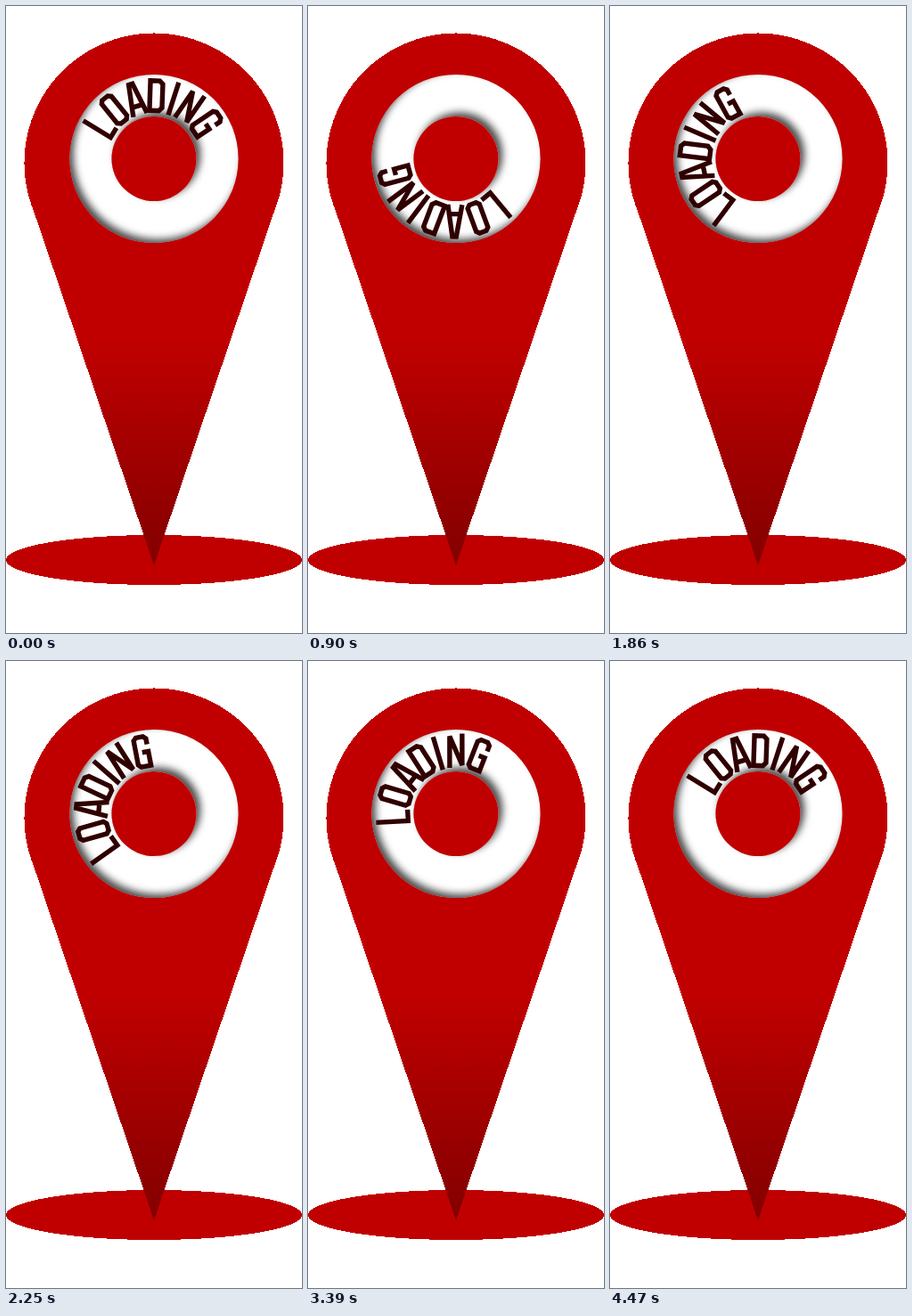
Animation of 332 by 704 pixels, one loop 4500 ms. Source, as an HTML page:

```html
<!DOCTYPE html>
<html lang="en">
<head>
<meta charset="utf-8">
<title>Loading</title>
<style>
  html, body { margin: 0; width: 100%; height: 100%; overflow: hidden; background: #fff; }
  svg { display: block; width: 332px; height: 704px; }
</style>
</head>
<body>
<svg viewBox="0 0 332 704" role="img" aria-label="LOADING">
  <defs>
    <linearGradient id="body" gradientUnits="userSpaceOnUse" x1="0" y1="376" x2="0" y2="630">
      <stop stop-color="#c00000"/>
      <stop offset="1" stop-color="#820000"/>
    </linearGradient>
    <clipPath id="ring">
      <path clip-rule="evenodd" d="M-94.6 0a94.6 94.6 0 1 0 189.2 0a94.6 94.6 0 1 0-189.2 0M-47.5 0a47.5 47.5 0 1 0 95 0a47.5 47.5 0 1 0-95 0"/>
    </clipPath>
    <filter id="shade" filterUnits="userSpaceOnUse" x="-130" y="-130" width="260" height="260">
      <feDropShadow dx="4.5" dy="-4.5" stdDeviation="4" flood-color="#000" flood-opacity=".72"/>
    </filter>
  </defs>
  <g shape-rendering="crispEdges">
    <ellipse cx="166" cy="622" rx="166" ry="28" fill="#c00000"/>
    <path d="M31.3 231L166 628L300.7 231A145.5 145.5 0 1 0 31.3 231Z" fill="url(#body)"/>
  </g>
  <g transform="translate(166 171.5)">
    <g clip-path="url(#ring)">
      <circle r="96" fill="#fff"/>
      <!-- everything around the ring casts an inner shadow on it -->
      <path filter="url(#shade)" fill="#c00000" fill-rule="evenodd"
        d="M-125-125H125V125H-125ZM-95 0a95 95 0 1 0 190 0a95 95 0 1 0-190 0M-47.5 0a47.5 47.5 0 1 0 95 0a47.5 47.5 0 1 0-95 0"/>
    </g>
    <g id="word" fill="none" stroke="#300000" stroke-width="5.4"/>
  </g>
</svg>
<script>
  const LOOP = 4500, STEP = 30;
  const word = document.getElementById('word');

  // Condensed lettering: [angle on the ring, strokes]
  const letters = [
    [-58.5, 'M-5-90V-54H7.5'],                                           // L
    [-39, 'M-4-87.5H4L7-84.5V-57L4-54H-4L-7-57V-84.5Z'],                 // O
    [-17.5, 'M-8-51.5L-2.2-87.5H2.2L8-51.5M-6-62H6'],                    // A
    [2, 'M-7-87.5H3.5L7-84V-57.5L3.5-54H-7Z'],                           // D
    [18, 'M0-90V-51.5'],                                                 // I
    [34.5, 'M-7-51.5V-87L7-54.5V-90'],                                   // N
    [56, 'M7-78V-84.5L4-87.5H-4L-7-84.5V-57L-4-54H7V-70H0']              // G
  ];
  word.innerHTML = letters.map(([angle, d]) => `<path transform="rotate(${angle})" d="${d}"/>`).join('');

  const bezier = (a, b, s) => 3 * s * (1 - s) ** 2 * a + 3 * s * s * (1 - s) * b + s ** 3;

  // Fast start, slow middle, slightly quicker finish
  function ease(x) {
    let low = 0, high = 1;
    for (let i = 0; i < 24; i++) {
      const mid = (low + high) / 2;
      if (bezier(1 / 6, 5 / 6, mid) < x) low = mid; else high = mid;
    }
    return bezier(1, 5 / 6, high);
  }

  function draw() {
    const time = Math.floor(performance.now() % LOOP / STEP) * STEP;
    const turn = time ? 360 * ease(time / (LOOP - STEP)) : 0;
    word.setAttribute('transform', `rotate(${turn})`);
    requestAnimationFrame(draw);
  }
  draw();
</script>
</body>
</html>
```
